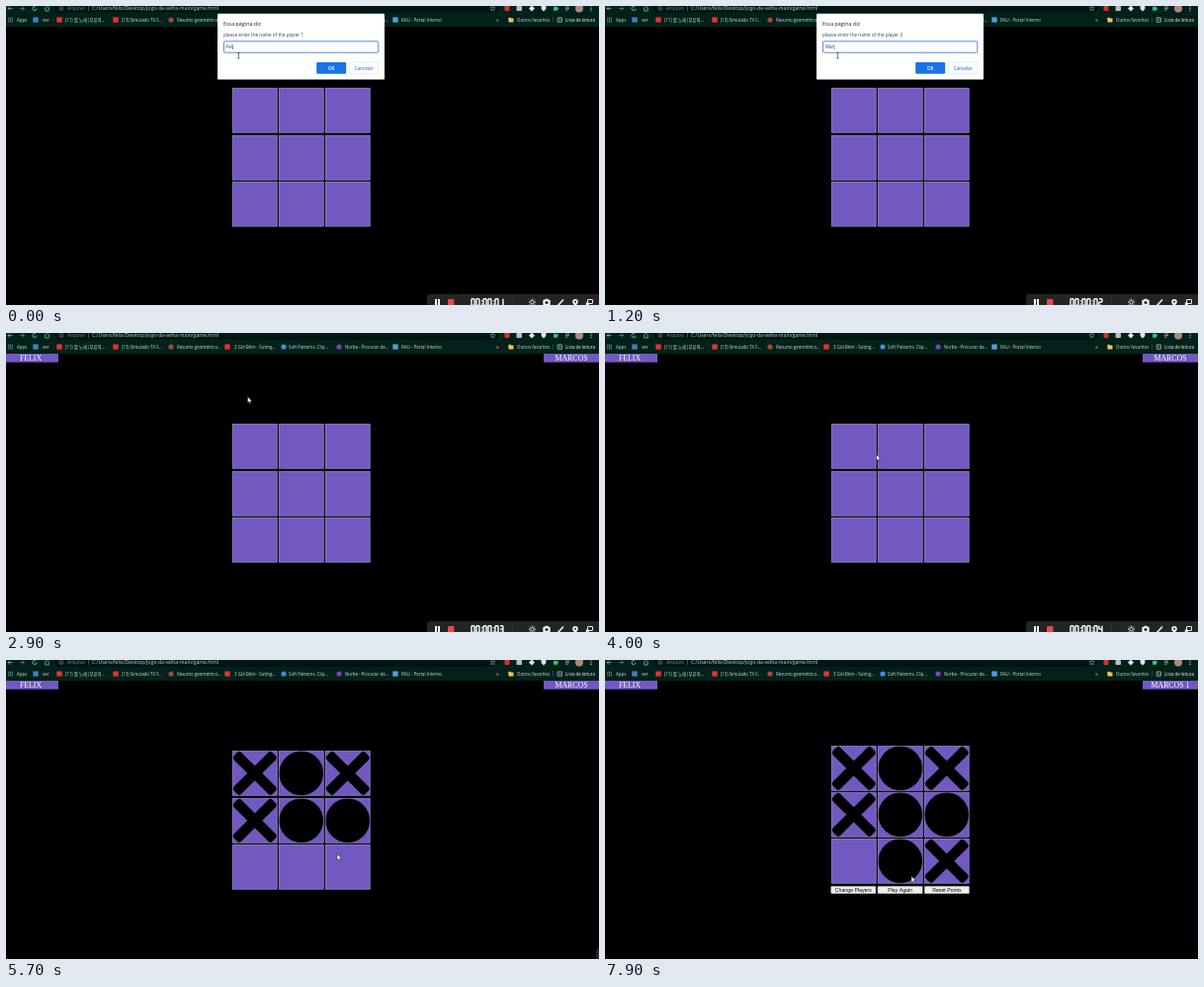
An HTML page with a canvas that plays this animation: 600x303 px, repeating every 8000 ms.

```html
<!DOCTYPE html>
<html lang="pt">
<head>
<meta charset="utf-8">
<title>Jogo da velha</title>
<style>
  html, body { margin: 0; width: 100%; height: 100%; overflow: hidden; background: #000; }
  canvas { display: block; width: 600px; height: 303px; }
</style>
</head>
<body>
<canvas id="stage" width="600" height="303"></canvas>
<script>
const W = 600, H = 303, LOOP = 8000, STEP = 100;
const PURPLE = '#7159c1';
const CELL = 45.5;
const SANS = '"Open Sans", "Noto Sans", "Noto Sans CJK KR", "Noto Sans CJK", sans-serif';
const SERIF = '"Liberation Serif", serif';
const ARIAL = '"Liberation Sans", sans-serif';
const screen = document.getElementById('stage').getContext('2d');
const layer = document.createElement('canvas');
layer.width = W;
layer.height = H;
const sheet = layer.getContext('2d');
let g = screen;

const PLAYERS = ['Felix', 'Marcos'];
// [time, letters typed]
const TYPED = [
  [[0, 3], [100, 4], [200, 5]],
  [[0, 0], [800, 1], [1100, 2], [1200, 3], [1600, 4], [1800, 5], [2000, 6]]
];
// [time, cell, mark]
const MOVES = [
  [4200, 0, 'X'], [4500, 1, 'O'], [4700, 3, 'X'], [4900, 4, 'O'], [5300, 2, 'X'],
  [5500, 5, 'O'], [5900, 8, 'X'], [6200, 7, 'O']
];
const WIN = 6300;
// [time, x, y]
const POINTER = [
  [2100, 231.5, 46], [2700, 231.5, 46], [3200, 264, 92], [3600, 298, 126], [4000, 274.5, 123],
  [4200, 255, 118], [4500, 296, 120], [4700, 258, 160], [4900, 296, 160], [5100, 324, 123],
  [5300, 343, 118], [5500, 345, 160], [5700, 335, 196.5], [5900, 338, 204], [6200, 300, 204],
  [6600, 262, 192], [7200, 312, 206], [7500, 321, 221], [7900, 310, 219]
];
const SLIDE = [[4700, 0], [5100, 56], [5600, 171], [6200, 171], [6300, 176]];
const FADE = [
  [200, 1], [300, 0.7], [400, 0.15], [500, 0.6], [600, 1],
  [2000, 1], [2100, 0.5], [2200, 0.15], [2300, 0]
];
// [icon x, icon colour, round, text x, label]
const LINKS = [
  [30, '#3f7fc4', 0, 37, 'ver'],
  [54, '#e3342b', 0, 60, '(11) 별 노래|푸른의...'],
  [111, '#e3342b', 0, 117, '(13) Simulado TX F...'],
  [167, '#a8483a', 1, 173, 'Resumo geométrico...'],
  [224, '#e3342b', 0, 231, '3 Giờ Đêm - Sương...'],
  [281, '#3d8fe0', 1, 286, 'Soft Patterns, Clip...'],
  [337, '#7a45b8', 1, 343, 'Norbe - Procurar de...'],
  [394, '#4aa3e0', 0, 400, 'RAU - Portal Interno']
];

// Linear value of track column i at time t
function track(keys, t, i = 1) {
  if (t <= keys[0][0]) return keys[0][i];
  for (let k = 1; k < keys.length; k++) {
    const a = keys[k - 1], b = keys[k];
    if (t <= b[0]) return a[i] + (b[i] - a[i]) * (t - a[0]) / (b[0] - a[0]);
  }
  return keys[keys.length - 1][i];
}

function rect(x, y, w, h, color) {
  g.fillStyle = color;
  g.fillRect(x, y, w, h);
}

function box(x, y, w, h, r, fill, stroke, width = 0.5) {
  g.beginPath();
  g.roundRect(x, y, w, h, r);
  if (fill) { g.fillStyle = fill; g.fill(); }
  if (stroke) { g.strokeStyle = stroke; g.lineWidth = width; g.stroke(); }
}

function disc(x, y, r, fill) {
  g.beginPath();
  g.arc(x, y, r, 0, 7);
  g.fillStyle = fill;
  g.fill();
}

function ring(x, y, r, color, from = 0, to = 7, width = 0.8) {
  g.beginPath();
  g.arc(x, y, r, from, to);
  g.strokeStyle = color;
  g.lineWidth = width;
  g.stroke();
}

// Polyline from a flat list of coordinates
function path(pts, stroke, width, fill) {
  g.beginPath();
  for (let i = 0; i < pts.length; i += 2) g.lineTo(pts[i], pts[i + 1]);
  if (fill) { g.closePath(); g.fillStyle = fill; g.fill(); }
  if (stroke) { g.strokeStyle = stroke; g.lineWidth = width; g.stroke(); }
}

function text(str, x, y, size, color, family = SANS, align = 'left', weight = '') {
  g.font = `${weight} ${size}px ${family}`;
  g.textAlign = align;
  g.fillStyle = color;
  g.fillText(str, x, y);
}

function drawBrowser() {
  const ink = '#c8e8d6', green = '#7fd9a4', dim = '#6f9484';
  rect(0, 0, W, 21, '#03211a');
  box(49, -6, 450, 13, 6, '#021512');
  path([6.5, 2.5, 2, 2.5, 4, 0.5], green, 0.7);
  path([2, 2.5, 4, 4.5], green, 0.7);
  path([14, 2.5, 18.5, 2.5, 16.5, 0.5], dim, 0.7);
  path([18.5, 2.5, 16.5, 4.5], dim, 0.7);
  ring(29, 2.5, 2, green, 0, 5.2);
  path([39, 2.5, 41.5, 0.2, 44, 2.5], green, 0.7);
  path([39.8, 2.2, 39.8, 5, 43.2, 5, 43.2, 2.2], green, 0.7);
  ring(56, 2.5, 1.9, dim, 0, 7, 0.6);
  rect(55.7, 2, 0.6, 1.8, dim);
  text('Arquivo', 62, 4.3, 5, dim);
  rect(83, 0, 0.5, 5, dim);
  text('C:/Users/felix/Desktop/jogo-da-velha-main/game.html', 87, 4.3, 5.1, '#a5e6be');

  const star = [];
  for (let i = 0; i <= 10; i++) {
    const r = i % 2 ? 1.2 : 2.7, a = i * Math.PI / 5;
    star.push(492.5 + r * Math.sin(a), 2.5 - r * Math.cos(a));
  }
  path(star, green, 0.5);
  box(504.5, -0.5, 5, 5.6, 1, '#d6322f');
  box(516.5, 0, 5.5, 5, 1, '#b8c0bd');
  path([532, -0.5, 535, 2.5, 532, 5.5, 529, 2.5], null, 0, '#dfe7e4');
  path([541.6, 0, 546.4, 0, 546.4, 3, 544, 5.4, 541.6, 3], null, 0, '#dfe7e4');
  box(554, 0.8, 4, 4, 0.5, '#35c07a');
  disc(558, 2.6, 1, '#35c07a');
  path([566, 1, 570, 1], ink, 0.6);
  path([566, 2.6, 570, 2.6], ink, 0.6);
  path([566, 4.2, 568.5, 4.2], ink, 0.6);
  disc(580, 2.5, 4, '#a98a7d');
  for (let i = 0; i < 3; i++) disc(592, 0.8 + i * 1.8, 0.55, ink);

  for (let i = 0; i < 9; i++)
    rect(2.2 + (i % 3) * 1.8, 11.7 + Math.floor(i / 3) * 1.8, 1.1, 1.1, ['#e0695c', '#62b27d', '#5d91db'][i % 3]);
  text('Apps', 11, 15.7, 4.4, ink);
  for (const [x, color, round, tx, label] of LINKS) {
    if (round) disc(x, 14, 2.6, color);
    else rect(x - 2.7, 11.4, 5.4, 5.2, color);
    text(label, tx, 15.7, 4.4, ink);
  }
  text('»', 496, 15.7, 5.5, ink);
  box(508.5, 11.8, 2.5, 2, 0.4, '#edc458');
  box(508.5, 12.4, 5, 4, 0.4, '#edc458');
  text('Outros favoritos', 517, 15.7, 4.4, ink);
  rect(553, 11, 0.5, 6, '#4d6a60');
  box(558, 11.8, 4.5, 4.5, 0.4, null, ink, 0.6);
  path([559, 13.2, 561.5, 13.2], ink, 0.5);
  path([559, 14.8, 561.5, 14.8], ink, 0.5);
  text('Lista de leitura', 566, 15.7, 4.4, '#f1f7f4');
}

function drawMark(mark, cx, cy) {
  if (mark === 'O') {
    disc(cx, cy, 22.4, '#000');
    return;
  }
  for (const turn of [1, -1]) {
    g.save();
    g.translate(cx, cy);
    g.rotate(turn * Math.PI / 4);
    box(-27.5, -5.3, 55, 10.6, 2.6, '#000');
    g.restore();
  }
}

function drawBoard(t) {
  const top = t < 2100 ? 83.3 : t < WIN ? 92.3 : 87;
  const at = i => [
    Math.round(228.6 + (i % 3) * 47.2),
    Math.round(top + Math.floor(i / 3) * 47.2)
  ];
  for (let i = 0; i < 9; i++) {
    const [x, y] = at(i);
    rect(x, y, CELL, CELL, PURPLE);
  }
  for (const [time, cell, mark] of MOVES) {
    if (t < time) continue;
    const [x, y] = at(cell);
    drawMark(mark, x + CELL / 2, y + CELL / 2);
  }
  for (let i = 0; i < 9; i++) {
    const [x, y] = at(i);
    box(x + 0.25, y + 0.25, CELL - 0.5, CELL - 0.5, 0, null, '#a79fc4', 0.5);
  }
  if (t < WIN) return;
  ['Change Players', 'Play Again', 'Reset Points'].forEach((label, i) => {
    const x = 228.4 + i * 47.3;
    box(x + 0.2, 229.2, 45.4, 7.6, 0.8, '#efefef', '#8a8a8a', 0.4);
    text(label, x + 22.9, 234.8, 5.2, '#000', ARIAL, 'center');
  });
}

function drawScores(t) {
  if (t < 2100) return;
  rect(0, 21, 53, 8.7, PURPLE);
  rect(544, 21, 56, 8.7, PURPLE);
  text(PLAYERS[0].toUpperCase(), 25, 28.1, 7.8, '#fff', SERIF, 'center');
  text(PLAYERS[1].toUpperCase() + (t < WIN ? '' : ' 1'), 572, 28.1, 7.8, '#fff', SERIF, 'center');
}

function drawDialog(t) {
  const alpha = track(FADE, t);
  if (alpha <= 0) return;
  const who = t < 500 ? 0 : 1;
  let count = 0;
  for (const [time, n] of TYPED[who]) if (t >= time) count = n;
  const name = PLAYERS[who].slice(0, count);

  g = sheet;
  g.clearRect(0, 0, W, H);
  box(214, 7.8, 169, 66.8, 1.2, '#fff');
  text('Essa página diz', 220, 20, 5.4, '#202124');
  text('please enter the name of the player ' + (who + 1), 220, 30.7, 4.65, '#3c4043');
  text(name, 223, 43.2, 4.5, '#33363b');
  if (alpha === 1) {
    rect(223.3 + g.measureText(name).width, 39.2, 0.5, 5, '#333');
    box(220.4, 35.8, 156.4, 11.4, 1.2, null, '#5b87dc', 1);
  }
  box(314.2, 57, 30, 11.8, 1.2, '#1a73e8');
  text('OK', 329.2, 64.6, 4.6, '#fff', SANS, 'center', '600');
  box(347.4, 57.2, 29.4, 11.4, 1.2, '#fff', '#dadce0', 0.6);
  text('Cancelar', 362.1, 64.6, 4.5, '#3b7fe0', SANS, 'center', '600');

  g = screen;
  const gone = 1 - alpha, zoom = 1 + 0.02 * gone;
  g.save();
  g.globalAlpha = alpha;
  g.translate(298.5, 41 - 9 * gone);
  g.scale(zoom, zoom);
  g.drawImage(layer, -298.5, -41);
  g.restore();
}

// Seven segments: top, upper right, lower right, bottom, lower left, upper left, middle
const SEGMENTS = [
  [0, 0, 1, 0], [1, 0, 1, 1], [1, 1, 1, 2], [0, 2, 1, 2], [0, 1, 0, 2], [0, 0, 0, 1], [0, 1, 1, 1]
];
const DIGITS = ['012345', '12', '01643', '01623', '5612', '05623', '056234', '012'];

function drawTimer(sec, x, y) {
  for (const ch of '00:00:0' + sec) {
    if (ch === ':') {
      rect(x, y + 1.4, 1.2, 1.2, '#fff');
      rect(x, y + 4.6, 1.2, 1.2, '#fff');
      x += 2.2;
      continue;
    }
    for (const s of DIGITS[ch]) {
      const [a, b, c, d] = SEGMENTS[s];
      path([x + a * 3, y + b * 3.3, x + c * 3, y + d * 3.3], '#fff', 1.4);
    }
    x += 4.9;
  }
}

function drawRecorder(t) {
  const shift = track(SLIDE, t), ink = '#f0f0f0';
  if (shift >= 175) return;
  g.save();
  g.translate(shift, 0);
  box(426, 292, 190, 24, 3, '#242424');
  rect(434, 297, 2, 6, '#fff');
  rect(437, 297, 2, 6, '#fff');
  box(447, 297, 6.4, 7, 1, '#e5484d');
  drawTimer(1 + Math.max(0, Math.floor((t - 100) / 1000)), 471, 296.8);
  for (let i = 0; i < 4; i++) rect(512, 295 + i * 2.2, 0.5, 1, '#5a5a5a');

  ring(532.5, 300.2, 1.8, ink, 0, 7, 0.9);
  for (let i = 0; i < 8; i++) {
    const c = Math.cos(i * Math.PI / 4), s = Math.sin(i * Math.PI / 4);
    path([532.5 + 2.5 * c, 300.2 + 2.5 * s, 532.5 + 3.6 * c, 300.2 + 3.6 * s], ink, 0.9);
  }
  box(543.3, 297.8, 7.4, 5.6, 1, ink);
  rect(545.4, 296.8, 3.2, 1.4, ink);
  disc(547, 300.6, 1.5, '#242424');
  path([558.5, 303.5, 564, 297.5], ink, 1.6);
  disc(576, 299.8, 2.8, ink);
  disc(576, 299.8, 1, '#242424');
  path([574, 301.5, 576, 304.5, 578, 301.5], null, 0, ink);
  box(588.5, 297.5, 5, 4, 0.3, null, ink, 1);
  box(586.8, 300.5, 3, 2.5, 0.3, ink);
  g.restore();
}

function drawPointer(t) {
  if (t < 2100) {
    path([235.3, 47.5, 235.3, 53], '#333', 0.7);
    path([234, 47.5, 236.6, 47.5], '#333', 0.6);
    path([234, 53, 236.6, 53], '#333', 0.6);
    return;
  }
  g.save();
  g.translate(track(POINTER, t, 1), track(POINTER, t, 2));
  path([0, 0, 0, 6.3, 1.4, 5, 2.4, 7.3, 3.5, 6.8, 2.5, 4.6, 4.4, 4.6, 0, 0], '#111', 0.5, '#fff');
  g.restore();
}

function draw(t) {
  g = screen;
  rect(0, 0, W, H, '#000');
  drawBrowser();
  drawScores(t);
  drawBoard(t);
  drawDialog(t);
  drawRecorder(t);
  drawPointer(t);
}

const start = performance.now();
function tick() {
  const t = (performance.now() - start) % LOOP;
  draw(Math.floor(t / STEP) * STEP);
  requestAnimationFrame(tick);
}
tick();
</script>
</body>
</html>
```
